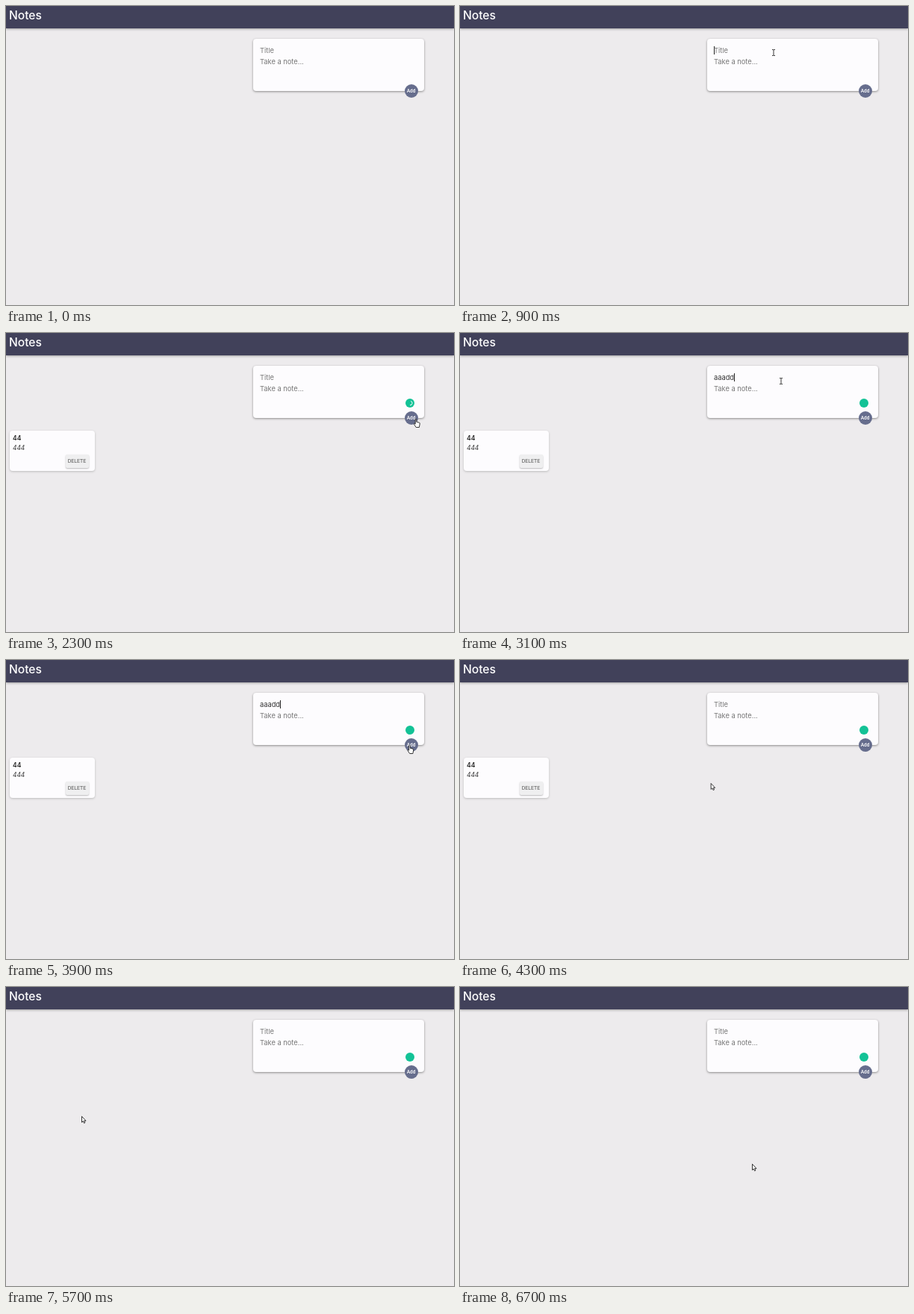
An HTML page that plays this animation: 600 px wide and 401 px high, repeating every 7100 ms.

```html
<!DOCTYPE html>
<html lang="en">
<head>
<meta charset="utf-8">
<title>Notes</title>
<style>
  html, body { margin: 0; width: 100%; height: 100%; overflow: hidden; }
  body { background: #edebed; font: 9.3px/16px Inter, sans-serif; color: #333; }
  body * { position: absolute; box-sizing: border-box; white-space: nowrap; }
  header { left: 0; top: 0; width: 600px; height: 30px; background: #41415a; box-shadow: 0 1px 3px #0005; }
  h1 { margin: 0; left: 4px; top: 5px; font: 500 15.6px/16px Inter, sans-serif; color: #fff; }
  .form, .note { background: #fdfcfe; border-radius: 4px; }
  .form { left: 331px; top: 44px; width: 229px; height: 70px; box-shadow: 0 1px 3px #8a8989; }
  .field { left: 9px; }
  .field * { position: static; }
  .hint { color: #777; }
  .caret { display: inline-block; width: 1px; height: 11px; margin-right: -1px; vertical-align: -2px; background: #222; }
  .add { left: 533.5px; top: 105px; width: 18px; height: 18px; border-radius: 50%; background: #666d8d;
    color: #fff; font: 500 6.5px/18px Roboto, sans-serif; text-align: center; }
  .badge { left: 535px; top: 87.5px; width: 12px; height: 12px; border-radius: 50%; background: #13c296; }
  .note { left: 4.5px; top: 131px; width: 114px; height: 54px; box-shadow: 0 1px 3px #bbb; }
  .note b { left: 4.5px; top: 2px; font-size: 8.5px; font-weight: 600; color: #222; }
  .note em { left: 4.5px; top: 15px; font-size: 8.4px; }
  .delete { left: 75px; top: 32px; width: 31px; height: 18px; border-radius: 2px; background: #efeff0;
    box-shadow: 0 1px 2px #0004; color: #555; font: 7px/18px Roboto, sans-serif; text-align: center; }
  svg { left: 0; top: 0; overflow: visible; }
  [hidden] { display: none !important; }
</style>
</head>
<body>
<header><h1>Notes</h1></header>
<div class="form">
  <div class="field" id="title" style="top:8px"><span class="typed"></span><i class="caret"></i><span class="hint">Title</span></div>
  <div class="field" id="body" style="top:23px"><span class="typed"></span><i class="caret"></i><span class="hint">Take a note...</span></div>
</div>
<div class="badge" id="badge">
  <svg id="spinner" width="12" height="12"><path d="M7 3.4A2.7 2.7 0 0 1 6 8.7" fill="none" stroke="#fff"/></svg>
</div>
<div class="add">Add</div>
<div class="note" id="note"><b>44</b><em>444</em><div class="delete">DELETE</div></div>
<svg id="pointer" width="1" height="1" fill="#fff" stroke="#222" stroke-width=".9" stroke-linejoin="round">
  <path id="arrow" d="M.5.5V8.5L2.3 6.9 3.5 9.6 4.9 9 3.7 6.4H6Z"/>
  <path id="beam" fill="none" d="M-2-3.5H-.6L0-3 .6-3.5H2M0-3V4M-2 4.5H-.6L0 4 .6 4.5H2"/>
  <path id="hand" d="M-.8.8Q0-.4.8.8V4.2L4.6 5.2Q5.4 5.6 5.2 7L4.4 11.5H.2L-2.4 7.6Q-2.8 6.4-1.8 6.4L-.8 7.2Z"/>
</svg>
<script>
const LOOP = 7100, STEP = 100;
const $ = id => document.getElementById(id);

// Pointer stops: time, x, y
const path = [
  [100, 596, 383], [800, 420, 62], [1200, 420, 62], [1600, 509, 114],
  [2000, 509, 114], [2200, 549, 115], [2300, 549, 115], [2400, 500, 85],
  [2500, 430, 64], [3300, 430, 64], [3800, 540.5, 114], [3900, 540.5, 114],
  [4100, 466, 122], [4400, 290, 180], [4600, 220, 172], [4900, 226, 164],
  [5500, 101, 173], [5700, 101, 173], [6300, 391, 238], [6500, 391, 237]
];

function pointerAt(t) {
  const i = path.findIndex(p => p[0] > t);
  if (i < 0) return path.at(-1).slice(1);
  const [t0, x0, y0] = path[i - 1], [t1, x1, y1] = path[i];
  const k = (t - t0) / (t1 - t0), e = k * k * (3 - 2 * k);
  return [x0 + (x1 - x0) * e, y0 + (y1 - y0) * e];
}

const within = (t, a, b) => t >= a && t < b;
const show = (id, on) => $(id).toggleAttribute('hidden', !on);
const typed = (text, t, times) => text.slice(0, times.filter(s => s <= t).length);

function setField(id, text, focused) {
  const [value, caret, hint] = $(id).children;
  value.textContent = text;
  caret.hidden = !focused;
  hint.hidden = text !== '';
}

function draw(t) {
  const title = t < 2200 ? typed('44', t, [1100, 1300])
    : t < 4000 ? typed('aaadd', t, [2600, 2700, 2800, 3000, 3100]) : '';
  const body = t < 2200 ? typed('444', t, [1800, 1900, 2000]) : '';
  setField('title', title, within(t, 900, 1500) || within(t, 2500, 4000));
  setField('body', body, within(t, 1500, 2200));

  const hasNote = within(t, 2200, 5700);
  show('note', hasNote);
  show('badge', t >= 2000);
  show('spinner', t < 2500);
  $('spinner').style.transform = `rotate(${(t - 2300) * 0.9}deg)`;

  show('pointer', t >= 100);
  if (t < 100) return;
  const [x, y] = pointerAt(t);
  const overAdd = Math.hypot(x - 542.5, y - 114) < 9;
  const overDelete = hasNote && within(x, 80, 111) && within(y, 163, 181);
  const overForm = within(x, 331, 560) && within(y, 44, 115);
  const shape = overAdd || overDelete ? 'hand' : overForm ? 'beam' : 'arrow';
  for (const id of ['arrow', 'beam', 'hand']) show(id, id === shape);
  $('pointer').style.transform = `translate(${x}px, ${y}px)`;
}

function tick() {
  const t = performance.now() % LOOP;
  draw(Math.floor(t / STEP) * STEP);
  requestAnimationFrame(tick);
}
tick();
</script>
</body>
</html>
```
